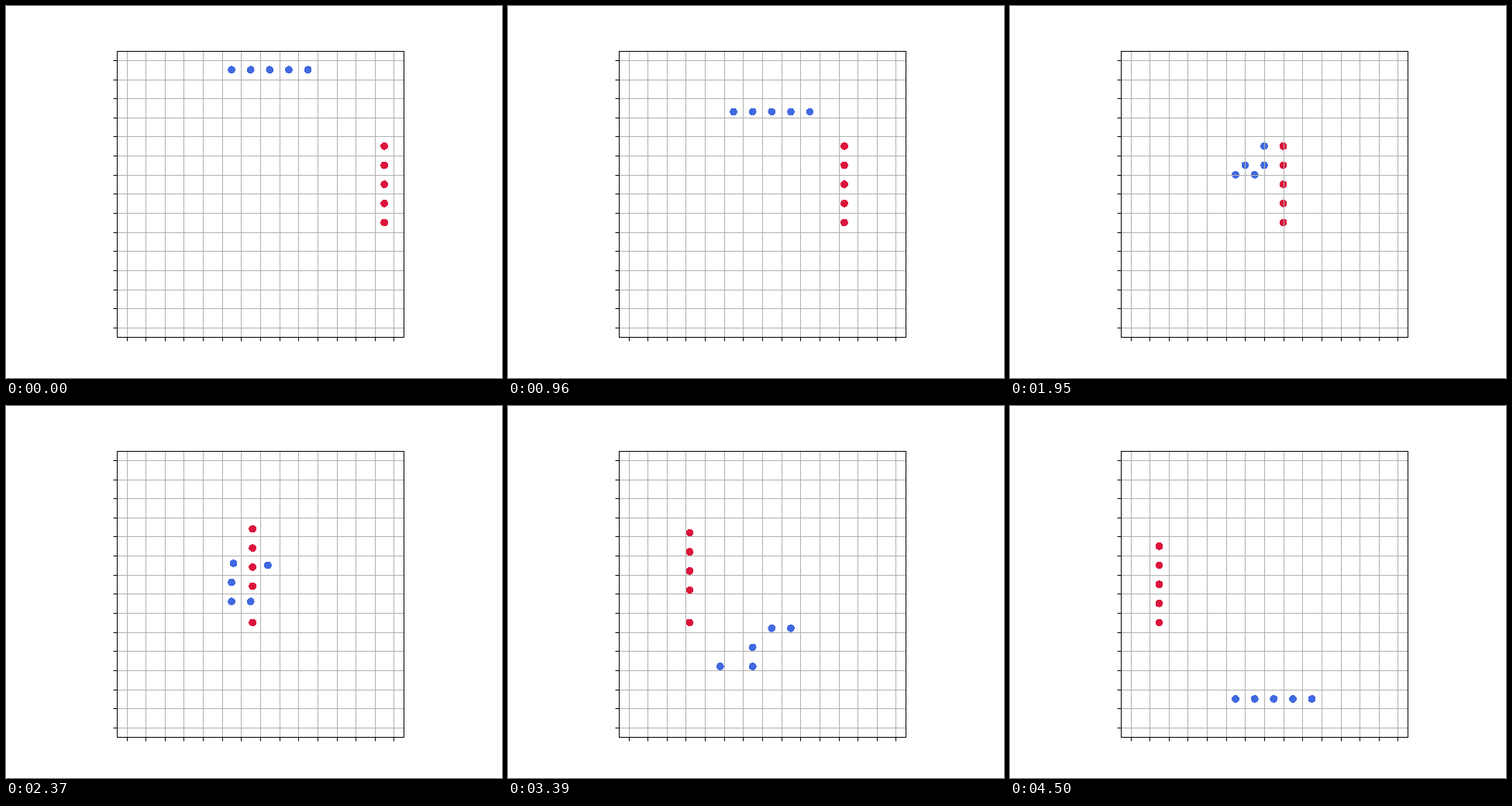
Animation of 640 by 480 pixels, one loop 6150 ms. Source, as an HTML page with a canvas:

```html
<!DOCTYPE html>
<html lang="en">
<head>
<meta charset="utf-8">
<title>Crossing teams</title>
<style>
html, body { margin: 0; width: 100%; height: 100%; overflow: hidden; background: #fff; }
canvas { display: block; }
</style>
</head>
<body>
<canvas id="stage" width="640" height="480"></canvas>
<script>
const ctx = document.getElementById('stage').getContext('2d');
const LOOP = 6150, STEP = 30, STEPS_PER_BEAT = 10, BEATS = 15;
const CELL = 24.64, LEFT = 143.2, TOP = 57.6, CELLS = 15;
const GOAL = 13, RADIUS = 4.86, TICK = 5;

// Each runner advances one cell per beat; the lists name the beats
// on which it waits or steps to a neighbouring lane.
const runner = (lane, { wait = [], down = [], up = [] } = {}) => ({ lane, wait, down, up });

const blue = [
  runner(6, { down: [8], up: [11] }),
  runner(7),
  runner(8, { wait: [4, 6], down: [6, 7], up: [8, 9, 13] }),
  runner(9, { wait: [6], down: [4, 5, 6], up: [8, 12] }),
  runner(10, { wait: [6, 7], down: [4, 5, 6], up: [7, 9, 13] })
];
const dodge = { down: [7], up: [11] };
const red = [5, 6, 7, 8, 9].map(lane => runner(lane, lane < 9 ? dodge : {}));

// Total progress of one-beat ramps that begin on the given beats.
const ramps = (beats, t) =>
  beats.reduce((sum, b) => sum + Math.min(Math.max(t - b, 0), 1), 0);

// The first cell is taken at half speed.
const pace = t => Math.max(t, 1 + t / 2);

const ahead = (r, t) => Math.min(pace(t) - ramps(r.wait, t), GOAL);
const lane = (r, t) => r.lane + ramps(r.up, t) - ramps(r.down, t);

// A hard-edged disc, filled row by row.
function disc(cx, cy) {
  for (let y = Math.floor(cy - RADIUS); y < cy + RADIUS; y++) {
    const dy = y + 0.5 - cy;
    if (Math.abs(dy) > RADIUS) continue;
    const half = Math.sqrt(RADIUS * RADIUS - dy * dy);
    const a = Math.ceil(cx - half - 0.5), b = Math.floor(cx + half - 0.5);
    if (b >= a) ctx.fillRect(a, y, b - a + 1, 1);
  }
}

function drawTeam(team, color, toCell, t) {
  ctx.fillStyle = color;
  for (const r of team) {
    const [x, y] = toCell(ahead(r, t), lane(r, t));
    disc(LEFT + x * CELL, TOP + y * CELL);
  }
}

const snap = v => Math.round(v) + 0.5;
const x0 = snap(LEFT), x1 = snap(LEFT + CELLS * CELL);
const y0 = snap(TOP), y1 = snap(TOP + CELLS * CELL);

function line(ax, ay, bx, by) {
  ctx.beginPath();
  ctx.moveTo(ax, ay);
  ctx.lineTo(bx, by);
  ctx.stroke();
}

function drawAxes() {
  ctx.lineWidth = 1;
  for (let i = 0.5; i < CELLS; i++) {
    const x = snap(LEFT + i * CELL), y = snap(TOP + i * CELL);
    ctx.strokeStyle = '#b0b0b0';
    line(x, y0, x, y1);
    line(x0, y, x1, y);
    ctx.strokeStyle = '#000';
    line(x, y1, x, y1 + TICK);
    line(x0 - TICK, y, x0, y);
  }
  ctx.strokeRect(x0, y0, x1 - x0, y1 - y0);
}

function draw(ms) {
  const t = Math.min(Math.floor((ms % LOOP) / STEP) / STEPS_PER_BEAT, BEATS);
  ctx.fillStyle = '#fff';
  ctx.fillRect(0, 0, 640, 480);
  drawTeam(blue, '#4169e1', (fwd, side) => [side, fwd], t);
  drawTeam(red, '#dc143c', (fwd, side) => [CELLS - fwd, side], t);
  drawAxes();
}

const start = performance.now();
function tick() {
  draw(performance.now() - start);
  requestAnimationFrame(tick);
}
tick();
</script>
</body>
</html>
```
